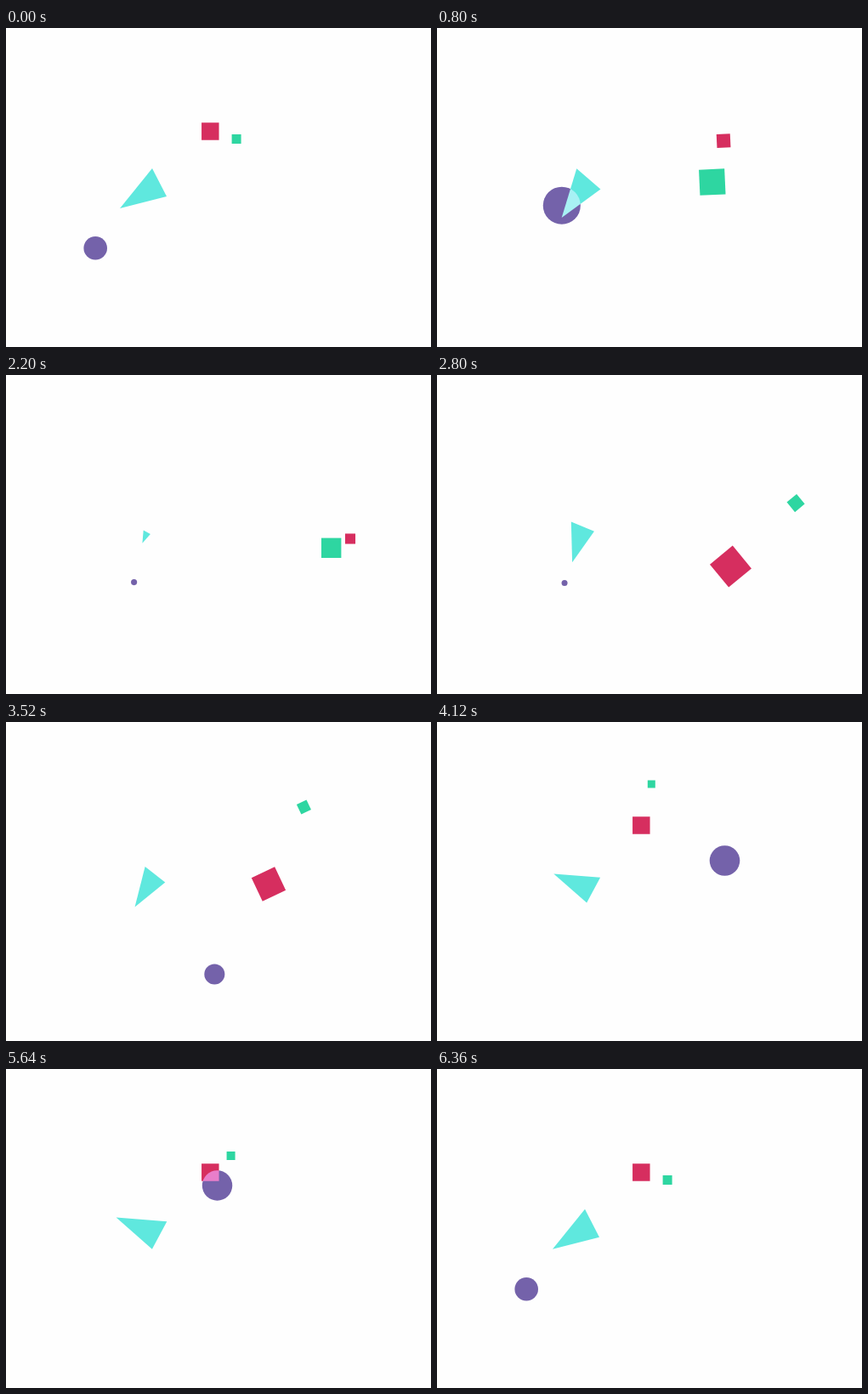
Animation, 500 px wide and 375 px high, one loop 6.4 s. Source, as an HTML page with a canvas:

```html
<!DOCTYPE html>
<html lang="en">
<head>
<meta charset="utf-8">
<title>Shapes</title>
<style>
html, body { margin: 0; width: 100%; height: 100%; overflow: hidden; background: #fefefe; }
canvas { display: block; }
</style>
</head>
<body>
<canvas id="stage" width="500" height="375"></canvas>
<script>
const ctx = document.getElementById('stage').getContext('2d');
const LOOP = 6400, MOVE = 640;

const easeInOut = u => u < .5 ? 4 * u ** 3 : 1 - 4 * (1 - u) ** 3;

// A move names only what changes; bend bows its path sideways.
function poseAt(t, home, moves) {
  const pose = { ...home };
  for (const { at, bend = {}, ...to } of moves) {
    const p = easeInOut(Math.min(1, Math.max(0, (t - at) / MOVE)));
    for (const k in to) pose[k] += (to[k] - pose[k]) * p;
    for (const k in bend) pose[k] += bend[k] * 4 * p * (1 - p);
  }
  return pose;
}

const circleHome = { x: 105.2, y: 258.7, r: 13.8 };
const circleMoves = [
  { at: 20, x: 146.7, y: 208.7, r: 22.1 },
  { at: 740, x: 174, r: 6 },
  { at: 1680, x: 150, y: 244.5, r: 3.5 },
  { at: 2770, x: 245, y: 297, r: 12 },
  { at: 3460, x: 338.5, y: 163, r: 17.8 },
  { at: 4130, x: 250.5, y: 135.3 },
  { at: 5545, ...circleHome }
];

const triangleHome = { x: 165, y: 191.7, turn: 0, scale: 1 };
const triangleMoves = [
  { at: 160, x: 167.8, y: 192.6, turn: -22 },
  { at: 1200, x: 164, y: 189.1, turn: -34, scale: .25 },
  { at: 2160, x: 167.3, y: 192.2, turn: -40.5, scale: .79 },
  { at: 3300, x: 168.5, y: 191.2, turn: 55.5, scale: .91 },
  { at: 4160, scale: .82 },
  { at: 5150, x: 163.3, y: 188.4, scale: 1 },
  { at: 5760, x: 167, y: 191.5, turn: 0 }
];

// The small square sits at (dx, dy) in the turning frame of the large one.
const squareHome = { x: 240.3, y: 121.5, size: 20.5 };
const pairHome = { ...squareHome, turn: 0, dx: 30.8, dy: 9, small: 11 };
const pairMoves = [
  { at: 285, x: 340, y: 133.5, size: 15.9, turn: 90, dx: 48.3, dy: 15.7, small: 30.7, bend: { y: -5 } },
  { at: 1280, x: 405, y: 192.5, size: 12.1, dx: 10.8, dy: 22.3, small: 23.4 },
  { at: 2275, x: 344.1, y: 225.8, size: 35.3, turn: 141.6, dx: -109.2, dy: 8.3, small: 14.8 },
  { at: 3240, ...squareHome, turn: 180, dx: -12, dy: 48.5, small: 9, bend: { dy: 47 } },
  { at: 5320, dx: -pairHome.dx, dy: -pairHome.dy, small: pairHome.small, bend: { dx: -2.8 } }
];

const radians = degrees => degrees * Math.PI / 180;

function place(x, y, turn, color, draw) {
  ctx.save();
  ctx.translate(x, y);
  ctx.rotate(radians(turn));
  ctx.fillStyle = color;
  ctx.beginPath();
  draw();
  ctx.fill();
  ctx.restore();
}
const square = (x, y, size, turn, color) =>
  place(x, y, turn, color, () => ctx.rect(-size / 2, -size / 2, size, size));

function render(t) {
  ctx.clearRect(0, 0, 500, 375);
  ctx.globalCompositeOperation = 'screen';

  const circle = poseAt(t, circleHome, circleMoves);
  place(circle.x, circle.y, 0, '#7462aa', () => ctx.arc(0, 0, circle.r, 0, 2 * Math.PI));

  const triangle = poseAt(t, triangleHome, triangleMoves);
  place(triangle.x, triangle.y, triangle.turn, '#5fe8de', () => {
    ctx.scale(triangle.scale, triangle.scale);
    ctx.moveTo(7, -26.7);
    ctx.lineTo(24, 6.3);
    ctx.lineTo(-31, 20.3);
  });

  const { x, y, size, turn, dx, dy, small } = poseAt(t, pairHome, pairMoves);
  const cos = Math.cos(radians(turn)), sin = Math.sin(radians(turn));
  square(x, y, size, turn, '#d62e5f');
  square(x + dx * cos - dy * sin, y + dx * sin + dy * cos, small, turn, '#2ed6a1');
}

const begin = performance.now();
function tick() {
  render((performance.now() - begin) % LOOP);
  requestAnimationFrame(tick);
}
tick();
</script>
</body>
</html>
```
